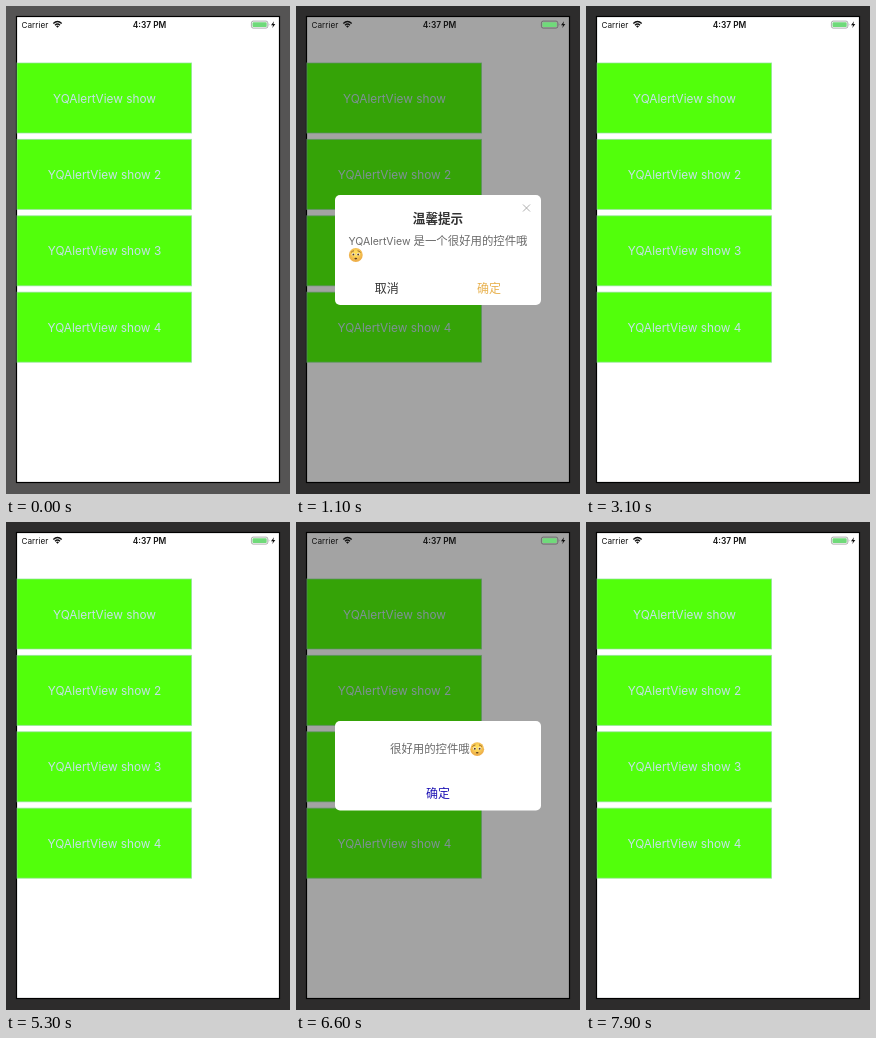
These frames come from a looping animation (284 by 488 pixels, 8 s). An HTML page:

```html
<!DOCTYPE html>
<html lang="zh-CN">
<head>
<meta charset="utf-8">
<title>YQAlertView</title>
<style>
  html, body { margin: 0; width: 100%; height: 100%; overflow: hidden; background: #2d2c2c; }
  svg { display: block; width: 284px; height: 488px; }
  text { font-family: Inter, "Noto Sans CJK SC", "Noto Sans CJK", sans-serif; }
  .mid { text-anchor: middle; }
  .status { font-size: 8.2px; fill: #111; }
  .label { font-size: 11.8px; fill: #c6e0ea; }
  .cjk { font-family: "Noto Sans CJK SC", "Noto Sans CJK", sans-serif; font-size: 12px; }
  .title { font-size: 12.6px; font-weight: 700; fill: #333; }
  .message { font-size: 11.4px; fill: #6a6a6a; }
  .latin { font-family: Inter, sans-serif; font-size: 10.5px; }

  .bezel { fill: #2d2c2c; animation: focus 8s step-end infinite; }
  .dim, .first, .second { opacity: 0; animation: dim 8s step-end infinite; }
  .first { animation-name: first; }
  .second { animation-name: second; }
  @keyframes focus { 0% { fill: #555454; } 11.25%, 100% { fill: #2d2c2c; } }
  @keyframes dim {
    0% { opacity: 0; } 13.75% { opacity: .36; } 38.75% { opacity: 0; }
    67.5% { opacity: .36; } 98.75%, 100% { opacity: 0; }
  }
  @keyframes first { 0% { opacity: 0; } 13.75% { opacity: 1; } 38.75%, 100% { opacity: 0; } }
  @keyframes second { 0% { opacity: 0; } 67.5% { opacity: 1; } 98.75%, 100% { opacity: 0; } }
</style>
</head>
<body>
<svg viewBox="0 0 284 488">
  <defs>
    <radialGradient id="skin" cy=".4">
      <stop offset=".3" stop-color="#ffdc5c"/>
      <stop offset="1" stop-color="#eeb04a"/>
    </radialGradient>
    <g id="button">
      <rect x="11" width="174.5" height="70" fill="#52ff0b"/>
      <rect x="11" width="174.5" height="70" fill="none" stroke="#8fe09a" stroke-opacity=".7"/>
    </g>
    <g id="face">
      <circle r="6.9" fill="url(#skin)"/>
      <g fill="#fff"><ellipse cx="-2.5" cy="-.7" rx="1.5" ry="1.2"/><ellipse cx="2.5" cy="-.7" rx="1.5" ry="1.2"/></g>
      <g fill="#5e3f20">
        <circle cx="-2.4" cy="-.5" r="1"/><circle cx="2.4" cy="-.5" r="1"/>
        <ellipse cy="3.6" rx="1.4" ry=".8"/>
      </g>
      <path d="M-4.8-2.6Q-3.5-4-1.8-4.2M4.8-2.6Q3.5-4 1.8-4.2" fill="none" stroke="#8a5a20" stroke-width=".8"/>
    </g>
  </defs>

  <rect class="bezel" width="284" height="488"/>
  <rect x="10.5" y="10.5" width="263" height="466" fill="#fff" stroke="#000" stroke-width="1.2"/>

  <use href="#button" y="57"/>
  <use href="#button" y="133.4"/>
  <use href="#button" y="209.8"/>
  <use href="#button" y="286.2"/>
  <g class="label mid">
    <text x="98.5" y="96.7">YQAlertView show</text>
    <text x="98.5" y="172.7">YQAlertView show 2</text>
    <text x="98.5" y="249.2">YQAlertView show 3</text>
    <text x="98.5" y="325.7">YQAlertView show 4</text>
  </g>

  <rect class="dim" x="11" y="11" width="262" height="465"/>

  <g class="status">
    <text x="15.5" y="21.5">Carrier</text>
    <text class="mid" x="143.5" y="21.5" font-weight="600" font-size="8.4">4:37 PM</text>
    <path d="M47.3 17.4Q51.5 13.6 55.7 17.4M49 19.2Q51.5 17 54 19.2" fill="none" stroke="#111" stroke-width="1.4"/>
    <path d="M50 20.2Q51.5 19 53 20.2L51.5 21.8Z"/>
    <rect x="245.4" y="15.1" width="16.4" height="7" rx="1.8" fill="none" stroke="#000" stroke-opacity=".4" stroke-width=".8"/>
    <rect x="246.5" y="16.2" width="14.2" height="4.8" rx=".8" fill="#70da7a"/>
    <path d="M262.8 17.3q1.2 1.3 0 2.6z" opacity=".45"/>
    <path d="M268 15.2L265 19.2H267L266.3 22L269.3 18H267.4Z"/>
  </g>

  <g class="first">
    <rect x="39" y="189" width="206" height="110" rx="5" fill="#fff"/>
    <path d="M227 198.5l7 7m0-7l-7 7" stroke="#999" stroke-width=".8"/>
    <text class="cjk mid title" x="142" y="217">温馨提示</text>
    <text class="cjk message" x="52.5" y="239.3"><tspan class="latin">YQAlertView </tspan>是一个很好用的控件哦</text>
    <use href="#face" x="59.8" y="249"/>
    <text class="cjk mid" x="90.8" y="286.5" fill="#333">取消</text>
    <text class="cjk mid" x="193" y="286.5" fill="#e8b250">确定</text>
  </g>

  <g class="second">
    <rect x="39" y="199" width="206" height="89.5" rx="5" fill="#fff"/>
    <text class="cjk message" x="94" y="231.3">很好用的控件哦</text>
    <use href="#face" x="181.2" y="227.2"/>
    <text class="cjk mid" x="142" y="276.2" fill="#1c12b4">确定</text>
  </g>
</svg>
</body>
</html>
```
